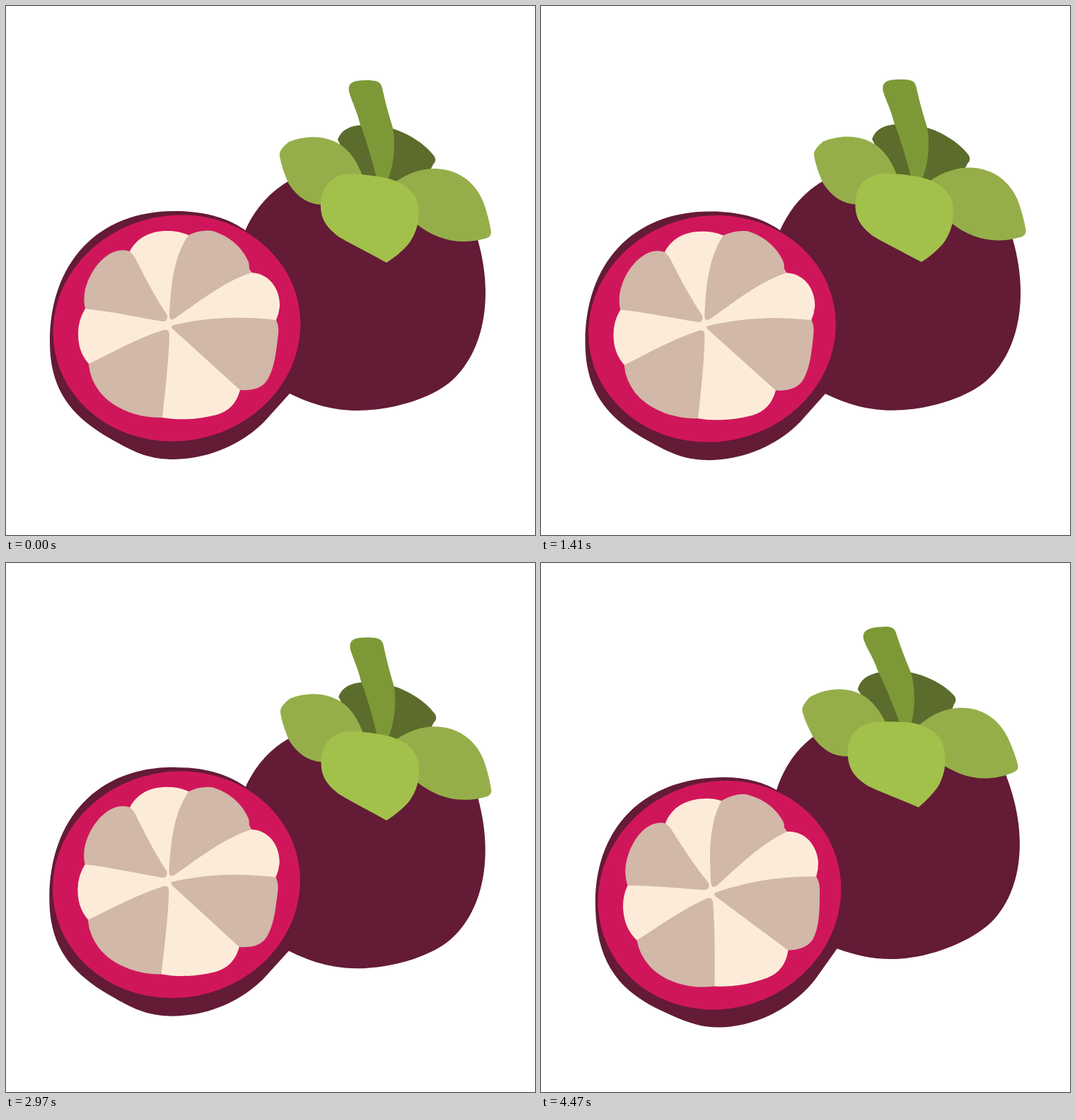
Write an HTML page that moves like this. It is 748 px wide and 748 px high and loops after 4.5 s.

```html
<!DOCTYPE html>
<html>
<head>
<meta charset="utf-8">
<title>Mangosteen</title>
<style>
html, body { margin: 0; width: 100%; height: 100%; overflow: hidden; background: #fff; }
svg { display: block; width: 100%; height: 100%; }
</style>
</head>
<body>
<svg viewBox="0 0 748 748">
  <g id="fruit">
    <!-- whole fruit -->
    <path fill="#631b36" d="M337 320C350 290 370 265 399 248L540 260L640 290Q662 310 667 330C674 355 678 380 678 405C678 455 663 500 630 530C602 555 545 572 497 572C460 572 430 562 401 548L300 450Z"/>
    <path fill="#5c6c2c" d="M469 189C475 172 492 168 510 168C548 166 590 190 606 213Q609 220 604 224L598 236L550 262L500 250Z"/>
    <path fill="#7d9937" d="M485 121C483 109 490 105 508 105C525 105 530 107 532 116C535 130 540 150 546 169C551 185 549 210 546 225C544 235 541 242 539 248L524 243C516 212 508 185 500 165C497 150 488 133 485 121Z"/>
    <g fill="#96ae4a">
      <path d="M387 212Q385 204 400 192C430 180 460 185 478 200C490 210 498 224 504 240L480 275L446 281C425 280 410 268 399 250C394 238 389 225 387 212Z"/>
      <path d="M550 249C570 235 590 230 605 230C640 230 665 250 676 280C682 298 685 312 686 320Q686 327 677 329C640 339 608 330 580 308Z"/>
    </g>
    <path fill="#a2c14b" d="M538 363C515 350 490 338 470 326C452 312 444 300 445 278C446 255 462 239 482 238C498 237 512 239 525 241C550 244 575 255 582 278C586 300 582 320 568 338C560 347 550 355 538 363Z"/>
    <!-- cut half -->
    <path fill="#631b36" d="M345 322C318 300 282 290 240 290C130 289 62 363 62 475C62 545 94 583 155 616C185 633 205 641 238 641C290 640 335 618 365 588L402 547L400 400Z"/>
    <ellipse fill="#d0165a" rx="175.5" ry="159.5" transform="translate(241.5 455.5) rotate(-11)"/>
    <path fill="#fdebd9" d="M175 347C185 328 203 318 228 318Q245 318 258 324L343 370L347 377C372 378 388 400 387 425Q386 435 382 444L331 543C326 562 315 573 298 578C270 585 245 586 221 582L117 506C105 492 102 478 102 463Q102 444 112 428Z"/>
    <g fill="#d1b8a8">
      <path d="M112 428C109 415 111 402 114 394C122 370 140 350 158 346Q168 344 175 347Q181 352 185 361C198 387 213 415 228 437Q229 446 222 446C185 440 150 432 112 428Z"/>
      <path d="M258 324Q275 316 292 318C318 326 335 343 343 362C345 368 342 374 347 377C310 389 275 416 240 441Q231 447 231 437C233 395 237 355 258 324Z"/>
      <path d="M382 444Q386 452 385 463C382 490 380 510 370 528C362 542 345 544 331 543L236 457Q231 452 238 451C290 439 335 439 382 444Z"/>
      <path d="M221 582C185 583 150 568 132 545Q118 526 117 506C150 490 185 470 223 458Q231 456 231 465C230 504 225 545 221 582Z"/>
    </g>
  </g>
</svg>
<script>
const LOOP = 4500, STEP = 30;
const fruit = document.getElementById('fruit');

// turning points of the sway: [ms, degrees]
const turns = [[0, 0], [240, 2.3], [1095, -3.15], [1410, -.3], [2140, -3.45],
  [2410, -.2], [2620, -1.2], [3210, 1.3], [LOOP, -6.1]];

const ease = u => u * u * (3 - 2 * u);

function sway(t) {
  const i = turns.findIndex(p => p[0] > t);
  const [t0, a] = turns[i - 1], [t1, b] = turns[i];
  return a + (b - a) * ease((t - t0) / (t1 - t0));
}

// the further it leans, the slimmer and taller it gets
function draw(ms) {
  const t = Math.floor((ms % LOOP) / STEP) * STEP;
  const tilt = sway(t);
  const wide = 1 - .00035 * tilt ** 2;
  const tall = 1 + .006 * Math.tanh(Math.abs(tilt));
  fruit.setAttribute('transform',
    `translate(374 374) scale(${wide} ${tall}) rotate(${tilt}) translate(-374 -374)`);
}

let start;
function tick(now) {
  start ??= now;
  draw(now - start);
  requestAnimationFrame(tick);
}
draw(0);
requestAnimationFrame(tick);
</script>
</body>
</html>
```
